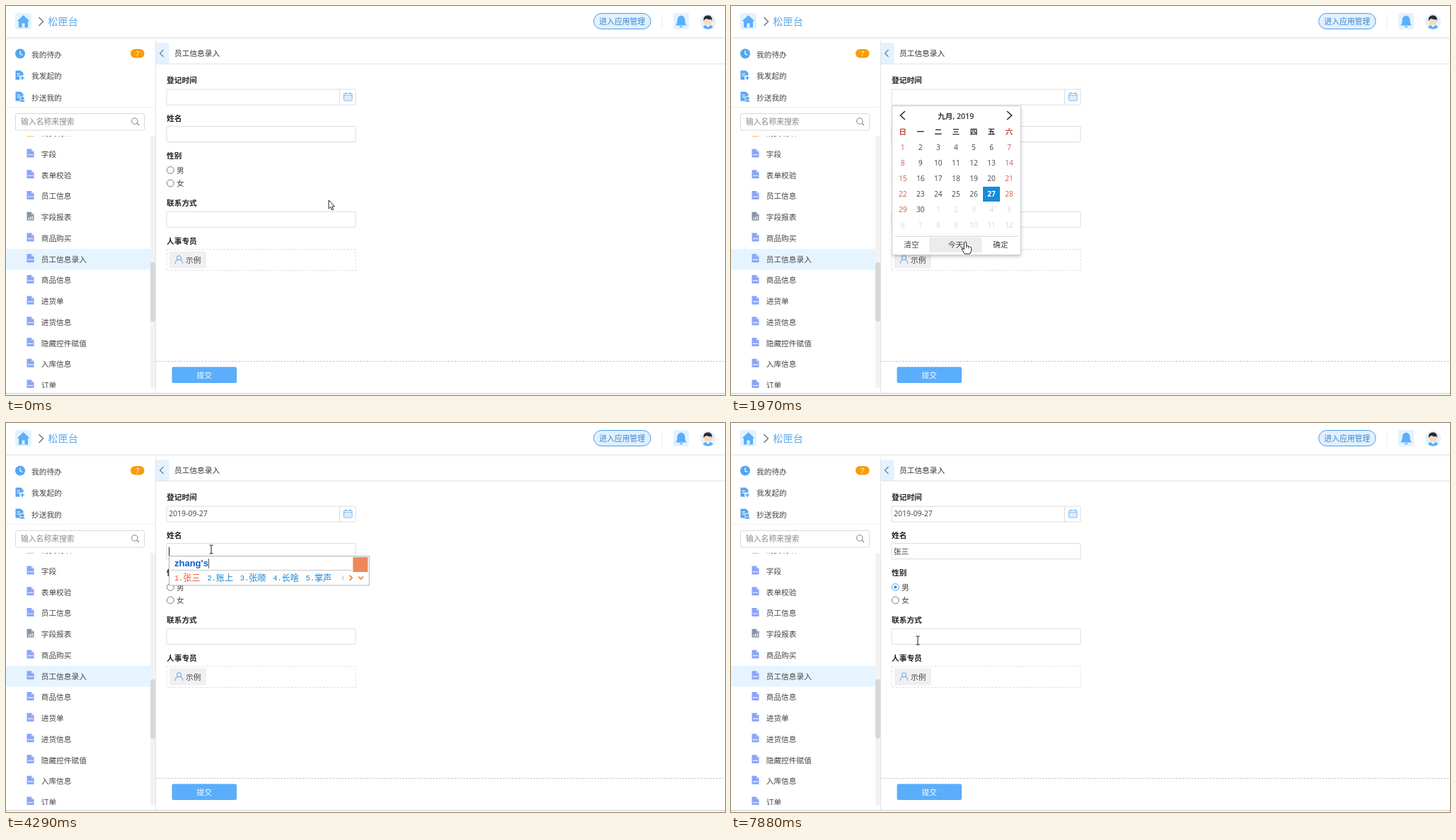
Write an HTML page with a canvas that moves like this. It is 1016x551 px and loops after 8 s.

```html
<!DOCTYPE html>
<html lang="zh-CN">
<head>
<meta charset="utf-8">
<title>员工信息录入</title>
<style>
html, body { margin: 0; width: 100%; height: 100%; overflow: hidden; background: #fff; }
canvas { display: block; width: 1016px; height: 551px; }
</style>
</head>
<body>
<canvas id="stage"></canvas>
<script>
const W = 1016, H = 551, LOOP = 8000;
const SANS = '"Open Sans", "Noto Sans CJK SC", "Noto Sans CJK", sans-serif';
const BLUE = '#5aaefb', PALE = '#e4f2fe', DARK = '#444', EDGE = '#dcdcdc';
const canvas = document.getElementById('stage');
const dpr = window.devicePixelRatio || 1;
canvas.width = W * dpr;
canvas.height = H * dpr;
const c = canvas.getContext('2d');

// ---------- helpers ----------
function text(s, x, y, o = {}) {
  const size = o.size || 10.7;
  c.font = `${o.weight || 400} ${size}px ${o.font || SANS}`;
  c.textAlign = o.align || 'left';
  c.fillStyle = o.color || DARK;
  c.fillText(s, x, y + size * 0.37);
}
function rect(x, y, w, h, fill, stroke, r = 0) {
  c.beginPath();
  c.roundRect(x, y, w, h, r);
  if (fill) { c.fillStyle = fill; c.fill(); }
  if (stroke) { c.strokeStyle = stroke; c.lineWidth = 1; c.stroke(); }
}
function line(points, color, width = 1, dash = []) {
  c.beginPath();
  points.forEach(([x, y], i) => i ? c.lineTo(x, y) : c.moveTo(x, y));
  c.setLineDash(dash);
  c.strokeStyle = color;
  c.lineWidth = width;
  c.stroke();
  c.setLineDash([]);
}
function poly(points, color) {
  c.beginPath();
  points.forEach(([x, y]) => c.lineTo(x, y));
  c.closePath();
  c.fillStyle = color;
  c.fill();
}
function disc(x, y, r, fill, stroke, width = 1) {
  c.beginPath();
  c.arc(x, y, r, 0, Math.PI * 2);
  if (fill) { c.fillStyle = fill; c.fill(); }
  if (stroke) { c.strokeStyle = stroke; c.lineWidth = width; c.stroke(); }
}
// chevron pointing left (dir -1) or right (dir 1)
function chevron(x, y, w, h, dir, color, width) {
  line([[x - dir * w / 2, y - h / 2], [x + dir * w / 2, y], [x - dir * w / 2, y + h / 2]], color, width);
}
function shape(d, x, y, fill, stroke, width = 1) {
  const p = new Path2D(d);
  c.save();
  c.translate(x, y);
  if (fill) { c.fillStyle = fill; c.fill(p); }
  if (stroke) { c.strokeStyle = stroke; c.lineWidth = width; c.stroke(p); }
  c.restore();
}

// ---------- timing ----------
// the screen refreshes in steps of about 80 ms
function tick(t) {
  const off = 50 + Math.max(0, 20 - t / 50) - (t > 7000 ? 10 : 0);
  return Math.floor((t - off) / 80) * 80 + 50;
}
const between = (t, a, b) => t >= a && t < b;

const PATH = [
  [-30, 456, 275], [770, 331, 128], [1250, 331, 128], [1970, 331, 334],
  [2130, 331, 334], [2690, 291, 180], [2770, 291, 180], [2850, 290, 179],
  [5650, 290, 179], [6050, 242, 232], [6450, 242, 232], [6610, 241, 234],
  [6690, 241, 234], [7090, 262, 304], [7170, 262, 304], [7330, 265, 309],
  [7730, 265, 309], [7890, 264, 308]
];
function pointer(t) {
  const i = PATH.findIndex(k => k[0] > t);
  if (i < 0) return PATH[PATH.length - 1].slice(1);
  if (!i) return PATH[0].slice(1);
  const [t0, x0, y0] = PATH[i - 1], [t1, x1, y1] = PATH[i];
  const p = (t - t0) / (t1 - t0), e = p * p * (3 - 2 * p);
  return [x0 + (x1 - x0) * e, y0 + (y1 - y0) * e];
}

// ---------- header ----------
function header() {
  const g = c.createLinearGradient(0, 43, 0, 48);
  g.addColorStop(0, '#e2e4e6');
  g.addColorStop(1, '#ffffff');
  c.fillStyle = g;
  c.fillRect(0, 44, W, 4);

  rect(13, 10, 23, 23, PALE, null, 3);
  poly([[24.5, 13], [33.5, 21.5], [31, 21.5], [31, 30.5], [18, 30.5], [18, 21.5], [15.5, 21.5]], BLUE);
  c.fillStyle = PALE;
  c.fillRect(22.5, 24.5, 4, 6);
  chevron(49.5, 22, 6, 12, 1, '#777', 1.5);
  text('松匣台', 59.3, 22, { size: 14.2, color: '#5cabf0' });

  rect(830.5, 10.5, 80.5, 22, '#e0f0ff', '#4b9ce6', 11);
  text('进入应用管理', 870.7, 21.7, { size: 10.8, color: '#3a86cc', align: 'center' });
  line([[927, 11], [927, 33]], '#e3eef8');

  rect(943, 10, 22, 23, PALE, null, 3);
  shape('M-8 6 Q-5.5 4 -5.5 -1 Q-5.5 -7 -1 -7.6 Q0 -9 1 -7.6 Q5.5 -7 5.5 -1 Q5.5 4 8 6 Z M-2.5 7 H2.5 Q1.8 9 0 9 Q-1.8 9 -2.5 7Z', 954, 21.5, BLUE);

  disc(992, 22, 11, PALE);
  shape('M-7 8.5 Q-6 4.5 0 4.5 Q6 4.5 7 8.5 Q0 13 -7 8.5Z', 992, 22, BLUE);
  shape('M-2.5 3 H2.5 V5.5 L0 8 L-2.5 5.5Z', 992, 22, '#fff');
  shape('M-5.5 -3 H5.5 Q6 4.8 0 5 Q-6 4.8 -5.5 -3Z', 992, 22, '#fbd9bd');
  shape('M-6 -.5 Q-7.5 -7 -2 -8.5 Q6 -10 6 -.5 L4.8 -3 Q0 -2.5 -2 -4 L-4.8 -3Z', 992, 22, '#2b2b30');
}

// ---------- sidebar ----------
const FILE = 'M0 0 H6.5 L10 3.5 V12 H0Z';
function fileIcon(y, report, color) {
  shape(FILE, 29.5, y - 6.8, color);
  shape('M6.5 0 V3.5 H10Z', 29.5, y - 6.8, '#d3dcfb');
  if (report) {
    for (let i = 0; i < 3; i++) {
      c.fillStyle = '#fff';
      c.fillRect(31.5 + i * 2.5, y + 1 - i, 1.2, 3 + i);
    }
  } else line([[31.2, y + 1.3], [37.8, y + 1.3]], '#fff', 1.4, [1.8, .6]);
}

const MENU = ['消费明细', '字段', '表单校验', '员工信息', '字段报表', '商品购买', '员工信息录入',
  '商品信息', '进货单', '进货信息', '隐藏控件赋值', '入库信息', '订单'];

function sidebar() {
  disc(20, 67.5, 7, '#56a5f2');
  line([[20, 63.5], [20, 68], [23.5, 69.5]], '#fff', 1.3);
  for (const y of [91.5, 121.5]) {
    shape('M0 0 H7.5 L11 3.5 V13 H0Z', 13.5, y, '#56a5f2');
    line([[15.5, y + 4.5], [20, y + 4.5]], '#fff', 1.2);
    line([[15.5, y + 7.5], [20, y + 7.5]], '#fff', 1.2);
  }
  disc(23, 102, 4, '#fff');
  line([[20.2, 102], [26, 102]], '#56a5f2', 1.5);
  line([[23.1, 99.1], [23.1, 104.9]], '#56a5f2', 1.5);
  disc(23, 131, 3.2, '#56a5f2', '#fff');
  shape('M-4 4.5 Q-3.5 1 0 1 Q3.5 1 4 4.5Z', 23, 131.5, '#56a5f2', '#fff', .7);
  ['我的待办', '我发起的', '抄送我的'].forEach((s, i) => text(s, 36, 69 + i * 30.3));
  rect(176, 61, 19.5, 12.5, '#f99d0b', null, 6.2);
  text('7', 185.7, 67.5, { size: 9.5, color: '#fff', align: 'center' });

  line([[0, 143.5], [211, 143.5]], '#f0f0f0');
  rect(13.5, 152.5, 182, 23.5, '#fff', '#d9d9d9', 2);
  text('输入名称来搜索', 21, 164, { color: '#8a8a8a', size: 10.8 });
  disc(181.8, 163, 4.2, null, '#888', 1.1);
  line([[185, 166], [188, 169]], '#888', 1.3);

  c.save();
  c.beginPath();
  c.rect(0, 184, 211, 357);
  c.clip();
  rect(0, 344, 204, 29.5, '#e6f4ff');
  MENU.forEach((s, i) => {
    const y = 180.3 + i * 29.73;
    fileIcon(y - .7, i === 4, i === 0 ? '#f5a83c' : i === 4 ? '#8793a3' : '#8ba4f8');
    text(s, 49.7, y);
  });
  rect(204, 184, 7, 357, '#f2f2f2');
  rect(204, 363, 7, 84, '#d8d8d8', null, 3);
  c.restore();
  line([[211.5, 46], [211.5, 548]], '#e3e3e3');
}

// ---------- form ----------
function radio(y, label, on) {
  disc(232.3, y, 4.9, '#fff', on ? '#4c9df0' : '#7a7a7a');
  if (on) disc(232.3, y, 2.2, '#3f97f0');
  text(label, 241, y + .3);
}

function form(t) {
  rect(212, 52, 18.5, 30, PALE, null, [0, 3, 3, 0]);
  chevron(220, 67, 5, 10, -1, '#4a87b8', 1.2);
  text('员工信息录入', 238, 67, { color: '#333' });
  line([[212, 82], [W, 82]], '#e0e0e0');

  [['登记时间', 105], ['姓名', 159], ['性别', 212], ['联系方式', 279.5], ['人事专员', 333]]
    .forEach(([s, y]) => text(s, 227, y, { weight: 600, color: '#222' }));
  for (const y of [118, 170.5, 291.3]) rect(227, y, 267, 22, '#fff', EDGE, 1);

  line([[471.5, 118], [471.5, 140]], EDGE);
  rect(477.5, 124, 11.5, 10, '#fff', '#6bb1f2', 1);
  line([[477.5, 126.8], [489, 126.8]], '#6bb1f2', 1);
  for (const x of [480, 486.5]) line([[x, 122.3], [x, 125]], '#6bb1f2', 1.2);
  for (const y of [129.2, 131.8]) line([[479.3, y], [487.5, y]], '#6bb1f2', 1.1, [1.7, 1.4]);
  if (t >= 2050) text('2019-09-27', 230, 128.5, { size: 10.5 });

  if (t >= 4770) text('张三', 229.7, 182, { color: '#333' });
  const caret = between(t, 2930, 3410) || between(t, 3890, 4450) ||
    between(t, 4770, 5250) || between(t, 5730, 6050);
  if (caret) {
    const x = t >= 4770 ? 252.5 : 230.5;
    line([[x, 175.5], [x, 188]], '#222');
  }

  radio(232.5, '男', t >= 6370);
  radio(251, '女', false);

  line([[227, 344.8], [494, 344.8], [494, 374.5], [227, 374.5], [227, 344.8]], '#dedede', 1, [3, 2]);
  rect(231, 347.5, 52, 24, '#f0f0f0', null, 1);
  disc(244.5, 356.8, 3, null, '#79a9ee', 1.1);
  shape('M-5.3 6 Q-5 1 -1.5 .5 M1.5 .5 Q5 1 5.3 6', 244.5, 359, null, '#79a9ee', 1.1);
  text('示例', 254, 360);

  line([[212, 503.3], [W, 503.3]], '#bdbdbd', 1, [2.5, 1.8]);
  rect(234.5, 511.3, 91.5, 22.7, BLUE, null, 2);
  text('提交', 280.3, 523, { color: '#fff', align: 'center' });
  line([[0, 548.7], [W, 548.7]], '#d8d8d8', 1.4);
}

// ---------- date picker ----------
function picker(alpha, hover) {
  c.save();
  c.globalAlpha = alpha;
  c.save();
  c.shadowColor = 'rgba(0,0,0,.25)';
  c.shadowBlur = 5;
  c.shadowOffsetY = 2;
  rect(227.5, 141.5, 182, 211, '#fff');
  c.restore();
  rect(227.5, 141.5, 182, 211, null, '#cfcfcf');
  chevron(242.7, 155, 6.5, 12, -1, '#333', 1.7);
  chevron(393.3, 155, 6.5, 12, 1, '#333', 1.7);
  const mid = { align: 'center' };
  text('九月, 2019', 317.7, 155.7, { ...mid, weight: 600, color: '#333', size: 10.6 });
  for (let col = 0; col < 7; col++) {
    const x = 242.7 + col * 25.07, red = col % 6 === 0;
    text('日一二三四五六'[col], x, 178, { ...mid, weight: 600, color: red ? '#c94f38' : '#333' });
    for (let row = 0; row < 6; row++) {
      const n = row * 7 + col + 1, y = 200 + row * 22.1;
      const today = n === 27;
      if (today) rect(356, 256, 24, 21, '#168cdb');
      text(n > 30 ? n - 30 : n, x, y, {
        ...mid, size: 10.2, weight: today ? 700 : 400,
        color: today ? '#fff' : n > 30 ? '#d6d6d6' : red ? '#c9614e' : '#444'
      });
    }
  }
  line([[232, 326.3], [406, 326.3]], '#d0d0d0');
  if (hover) rect(280, 328, 74.5, 21, '#ececec');
  [['清空', 255], ['今天', 317.5], ['确定', 381]].forEach(([s, x]) => text(s, x, 338.3, mid));
  c.restore();
}

// ---------- input method ----------
const TYPING = [
  [3650, 'z', '在中这自之'], [3810, 'zh', '这中之只着'], [3890, 'zha', '炸扎查渣眨'],
  [3970, 'zhan', '站占战展粘'], [4050, 'zhang', '张章长涨掌'],
  [4290, "zhang's", '张三 账上 张顺 长啥 掌声'], [4450, "zhang'sa", '张三 张飒 账洒 长啥 掌洒'],
  [4530, "zhang'san", '张三 张伞 掌散 长三 章三']
];
function ime(t) {
  if (!between(t, 3650, 4770)) return;
  const [, typed, words] = TYPING.filter(k => k[0] <= t).pop();
  const list = words.includes(' ') ? words.split(' ') : [...words];
  const wide = 22 + list[0].length * 12.2;
  const end = 238 + 4 * wide + wide - 9.7;
  rect(230.5, 188.5, end + 53 - 230.5, 41.5, '#fff', '#a9b2ba');
  const font = { size: 13, weight: 700, font: '"Liberation Sans", Arial, sans-serif', color: '#0a62c4' };
  text(typed, 238, 198.3, font);
  const x = 238.7 + c.measureText(typed).width;
  line([[x, 192], [x, 206]], '#555');
  line([[234, 208.5], [end + 29, 208.5]], '#c8c8c8');
  list.forEach((s, i) => {
    const color = i ? '#1a86d6' : '#f0582a', px = 238 + i * wide;
    text(i + 1 + '.', px, 219.5, { size: 10.4, color, font: '"Liberation Mono", monospace' });
    text(s, px + 12.3, 219.5, { size: 12.2, color });
  });
  chevron(end + 16, 219.3, 3, 6, -1, '#c5c5c5', 1.2);
  chevron(end + 27, 219.3, 3.5, 7, 1, '#ee8422', 1.7);
  line([[end + 37.5, 217.5], [end + 41, 221], [end + 44.5, 217.5]], '#ee8422', 1.7);
  rect(end + 30, 190, 21, 21, '#f0875a');
}

// ---------- mouse ----------
const ARROW = 'M0 0 V12.2 L2.7 9.7 L4.7 14 L6.6 13.1 L4.7 9 H8.4Z';
const HAND = 'M-1.7 1 Q0 -1.4 1.7 1 V6 Q3.8 4.9 4.5 6.8 Q6.3 5.8 7 7.6 Q8.7 7.2 8.7 9.4 V12.5 L6.8 17 H-.8 L-4.6 11 Q-5 8.8 -3.2 9.2 L-1.7 11Z';
function mouse(t, x, y, open) {
  const inBox = (l, top, r, b) => x >= l && x <= r && y >= top && y <= b;
  const hand = (open && inBox(227, 141, 410, 353)) || inBox(227, 118, 494, 140) || inBox(226, 226, 253, 257);
  const typing = inBox(227, 170, 494, 193) || inBox(227, 291, 494, 314);
  if (hand) {
    shape(HAND, x, y, '#fff', '#222');
    line([[x + 1.7, y + 6], [x + 1.7, y + 9]], '#222', .8);
    line([[x + 4.5, y + 7], [x + 4.5, y + 9.5]], '#222', .8);
  } else if (typing) {
    shape('M-2.7 -6 H-1 Q0 -6 0 -5 V5 Q0 6 -1 6 H-2.7 M2.7 -6 H1 Q0 -6 0 -5 M0 5 Q0 6 1 6 H2.7', x, y, null, '#333', 1.1);
  } else shape(ARROW, x, y, '#fff', '#222');
}

function draw(t) {
  c.setTransform(dpr, 0, 0, dpr, 0, 0);
  c.fillStyle = '#fff';
  c.fillRect(0, 0, W, H);
  const [x, y] = pointer(t), open = between(t, 930, 2050);
  sidebar();
  header();
  form(t);
  if (open) picker(t < 1010 ? 0.5 : 1, y > 327);
  ime(t);
  mouse(t, x, y, open);
}

const start = performance.now();
function loop() {
  draw(tick((performance.now() - start) % LOOP));
  requestAnimationFrame(loop);
}
loop();
</script>
</body>
</html>
```
